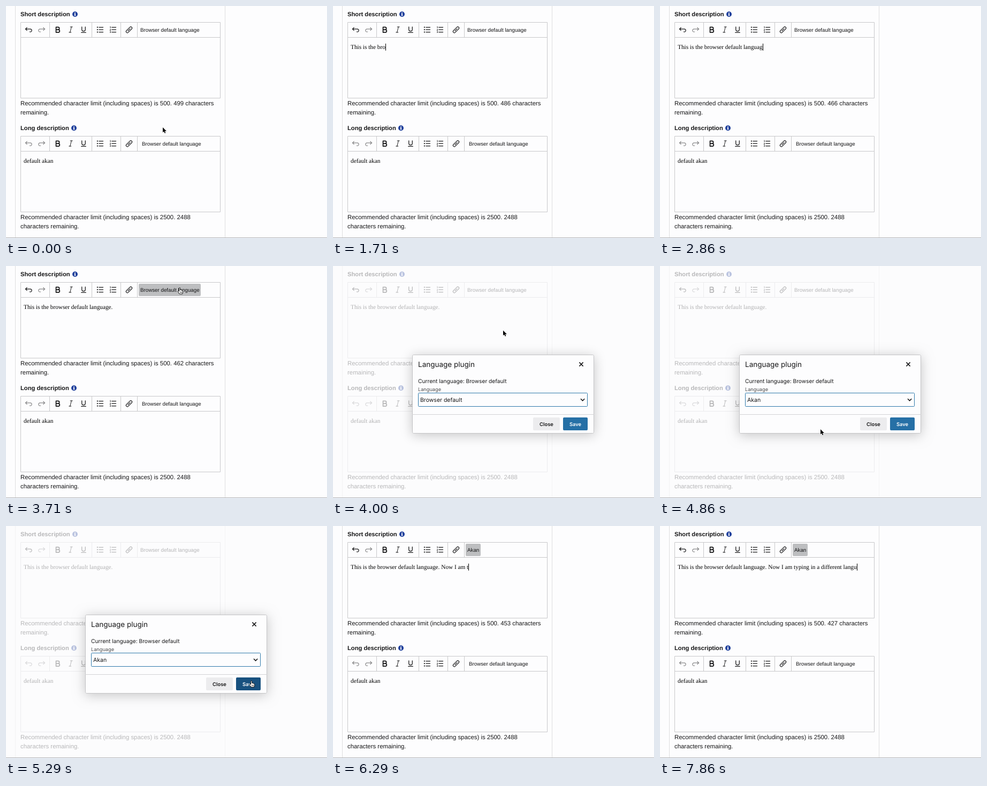
These frames come from a looping animation (600 px wide and 432 px high, 8000 ms). An HTML page with a canvas:

```html
<!DOCTYPE html>
<html lang="en">
<head>
<meta charset="utf-8">
<title>Editor language plugin</title>
<style>
  html, body { margin: 0; width: 100%; height: 100%; overflow: hidden; background: #fdfdfe; }
  canvas { display: block; width: 600px; height: 432px; }
</style>
</head>
<body>
<canvas id="stage"></canvas>
<script>
const W = 600, H = 432, LOOP = 8000, FPS = 7;
const canvas = document.getElementById('stage');
const ctx = canvas.getContext('2d');
const ratio = window.devicePixelRatio || 1;
canvas.width = W * ratio;
canvas.height = H * ratio;

const SANS = '"Liberation Sans", Arial, sans-serif';
const SERIF = '"Liberation Serif", Times, serif';
const UI = 'Inter, "Noto Sans", "DejaVu Sans", sans-serif';
const PAGE = '#fdfdfe', INK = '#161617', LINE = '#c8c8ca';

const FIRST = 'This is the browser default language.';
const FULL = FIRST + ' Now I am typing in a different langu';
const DEFAULT = 'Browser default';

// Menu entries; scripts with a smaller fallback face carry their own size.
const LANGUAGES = [[DEFAULT], ['аҧсуа'], ['Afaraf'], ['Afrikaans'], ['Akan'], ['Shqip'],
  ['አማርኛ', 12.4], ['العربية'], ['Aragonés'], ['Հայերեն'], ['অসমীয়া', 14.4],
  ['авар мацӀ, магӀарул мацӀ']];

// Pointer keys: step, x, y, shape; each holds until the next one.
const POINTER = [
  [0, 293, 226, 'arrow'], [1, 296, 220, 'arrow'], [2, 310, 182, 'arrow'],
  [3, 327, 125, 'beam'], [4, 331, 104, 'beam'], [6, 0, 0, ''],
  [25, 325, 44, 'hand'], [26, 325, 40.5, 'hand'], [28, 318, 120, 'arrow'],
  [29, 284, 247, 'hand'], [30, 279, 252, 'hand'], [31, 272, 284, 'hand'],
  [32, 262, 309, 'hand'], [34, 300, 304, 'arrow'], [35, 385, 297, 'hand'],
  [36, 452, 290, 'hand'], [37, 459, 288.5, 'hand'], [38, 459, 289, 'arrow'], [39, 0, 0, '']
];
const MODAL_OPEN = 28, MENU_OPEN = 30, MENU_SHUT = 34, SAVE_HOVER = 36, MODAL_SHUT = 38;

// Icons live on a 20 by 20 grid.
const ICONS = {
  undo: 'M6.7 5.3 3 8.6 6.7 11.8 M3.4 8.6H14a3.3 3.3 0 1 1-1.1 6.3',
  bold: 'M6 4h4.6a2.8 2.8 0 0 1 0 5.8H6z M6 9.8h5.2a3.1 3.1 0 0 1 0 6.2H6z',
  italic: 'M9 3.8h5 M6 16.2h5 M11.7 3.8 8.4 16.2',
  underline: 'M6 3.4v5.8a4 4 0 0 0 8 0V3.4 M4.8 16.4h10.4',
  lines: 'M8 4.6h9.4 M8 10.1h9.4 M8 15.6h9.4',
  link: 'M1.2 2.9H-5.6a2.9 2.9 0 0 1 0-5.8h3.2 M-1.2-2.9H5.6a2.9 2.9 0 0 1 0 5.8H2.4 M-3.4 0H3.4'
};
for (const name in ICONS) ICONS[name] = new Path2D(ICONS[name]);

const ARROW = new Path2D('M0 0V9.6L2.2 7.6 3.7 11 5.3 10.3 3.9 7H6.9Z');
const HAND = new Path2D('M-1.4 6.6V1A1.1 1.1 0 0 1 .8 1V4.2Q2.4 3.5 2.8 4.7 4.2 4.1 4.5 5.4 ' +
  '5.6 5.2 5.6 6.6V8.3L4.7 11.5H-.8L-3.6 7.4Q-3.7 5.9-2.5 6Z');
const BEAM = new Path2D('M-2.5-6.5Q0-6.5 0-5 0-6.5 2.5-6.5M0-5V5M-2.5 6.5Q0 6.5 0 5 0 6.5 2.5 6.5');

function text(str, x, y, size, family, color = INK, weight = 400, align = 'left') {
  ctx.font = `${weight} ${size}px ${family}`;
  ctx.fillStyle = color;
  ctx.textAlign = align;
  ctx.fillText(str, x, y);
}

function rect(x, y, w, h, color) {
  ctx.fillStyle = color;
  ctx.fillRect(x, y, w, h);
}

function round(x, y, w, h, r, color) {
  ctx.beginPath();
  ctx.roundRect(x, y, w, h, r);
  ctx.fillStyle = color;
  ctx.fill();
}

function frame(x, y, w, h, color, r = 0) {
  ctx.beginPath();
  ctx.roundRect(x + .5, y + .5, w - 1, h - 1, r);
  ctx.strokeStyle = color;
  ctx.lineWidth = 1;
  ctx.stroke();
}

function line(path, color, width) {
  ctx.strokeStyle = color;
  ctx.lineWidth = width;
  ctx.stroke(new Path2D(path));
}

function dot(x, y, r, color) {
  ctx.beginPath();
  ctx.arc(x, y, r, 0, Math.PI * 2);
  ctx.fillStyle = color;
  ctx.fill();
}

function withShadow(blur, dy, color, draw) {
  ctx.save();
  ctx.shadowBlur = blur * ratio;
  ctx.shadowOffsetY = dy * ratio;
  ctx.shadowColor = color;
  draw();
  ctx.restore();
}

function icon(name, cx, cy, { width = 1.5, alpha = 1, flip = 1, extra } = {}) {
  ctx.save();
  ctx.translate(cx, cy);
  ctx.scale(.815 * flip, .815);
  if (name === 'link') ctx.rotate(-Math.PI / 4);
  else ctx.translate(-10, -10);
  ctx.globalAlpha = alpha;
  ctx.strokeStyle = INK;
  ctx.lineWidth = width;
  ctx.lineCap = ctx.lineJoin = 'round';
  ctx.stroke(ICONS[name]);
  if (extra) extra();
  ctx.restore();
}

const bullets = () => [4.6, 10.1, 15.6].forEach(y => dot(4.4, y, 1.4, INK));
const digits = () => [1, 2, 3].forEach(n => text(n, 3, n * 5.5 + 1.2, 5.8, SANS, INK, 700));

function info(x, y) {
  dot(x, y, 5, '#20409c');
  rect(x - .8, y - 3.4, 1.7, 1.6, '#fff');
  rect(x - 1.4, y - 1, 2.2, 1, '#fff');
  rect(x - .8, y - 1, 1.7, 3.6, '#fff');
  rect(x - 1.6, y + 2, 3.2, 1, '#fff');
}

function editor(top, canUndo) {
  frame(27, top, 374, 142, LINE);
  rect(27, top + 28, 374, 1, LINE);
  [81, 160, 214, 245].forEach(x => rect(x, top, 1, 28, LINE));
  const y = top + 14;
  icon('undo', 42, y, { alpha: canUndo ? 1 : .5 });
  icon('undo', 67, y, { alpha: .5, flip: -1 });
  icon('bold', 96.8, y + .2, { width: 2.1 });
  icon('italic', 121, y, { width: 1.2 });
  icon('underline', 145, y + .2, { width: 1.6 });
  icon('lines', 175.5, y, { width: 1.6, extra: bullets });
  icon('lines', 199.5, y, { width: 1.6, extra: digits });
  icon('link', 230, y + .3, { width: 1.4 });
}

function note(limit, left, y) {
  const lead = `Recommended character limit (including spaces) is ${limit}. `;
  const short = limit === 500;
  text(lead + left + (short ? ' characters' : ''), 27, y, 11.4, SANS);
  text(short ? 'remaining.' : 'characters remaining.', 27, y + 17, 11.4, SANS);
}

function typed(step) {
  const count = step < 39
    ? Math.min(FIRST.length, 5 + 2.5 * (step - 8))
    : Math.max(FIRST.length, 39 + 2.31 * (step - 40));
  return Math.max(0, Math.round(count));
}

function page(step) {
  rect(0, 0, W, H, PAGE);
  rect(17, 0, 1, H, '#dededf');
  rect(409, 0, 1, H, '#dededf');
  rect(0, 431, W, 1, '#b4b4b6');

  text('Short description', 27, 19, 11.2, SANS, INK, 700);
  info(129, 15.3);
  editor(30, true);
  const akan = step >= MODAL_SHUT;
  if (akan) round(248, 33, 28, 23, 2, '#bdbec0');
  else if (step >= 25 && step < MODAL_OPEN) round(248, 33, 116, 23, 2, '#bdbec0');
  text(akan ? 'Akan' : 'Browser default language', 251, 48, 9.75, SANS);

  const count = typed(step);
  text(FULL.slice(0, count), 33, 80, 11.28, SERIF, '#000');
  const caret = (step >= 5 && step < 25) || step >= MODAL_SHUT;
  if (caret) rect(Math.round(33 + ctx.measureText(FULL.slice(0, count)).width), 70, 1, 13, '#000');
  const lag = count > typed(step - 1) ? 2 : 0;
  note(500, 499 - Math.max(0, count - lag), 185);

  text('Long description', 27, 231, 11.2, SANS, INK, 700);
  info(127, 227.3);
  editor(242, false);
  text('Browser default language', 254, 260, 9.75, SANS);
  text('default akan', 33, 292, 11.28, SERIF, '#000');
  note(2500, 2488, 397);
}

function modal(value, saveColor) {
  rect(0, 0, W, 431, 'rgba(253,253,254,.7)');
  withShadow(22, 3, 'rgba(0,0,0,.22)', () => round(148, 165, 340, 147, 2, PAGE));
  frame(148, 165, 340, 147, '#c4c4c6', 2);
  text('Language plugin', 159, 188, 13.5, UI);
  line('M460.4 179.4 467.6 186.6M467.6 179.4 460.4 186.6', INK, 1.5);
  text('Current language: ' + DEFAULT, 159, 218, 10.2, UI);
  text('Language', 159, 233, 9.2, UI, '#4c4c4e');
  frame(159, 236, 317, 26, '#2f79ab', 1);
  text(value, 163, 253, 10.5, UI);
  line('M463 247.2 466.6 250.8 470.2 247.2', INK, 1.6);
  rect(148, 276, 340, 1, '#d3d3d5');
  round(374, 282, 50, 24, 2, '#ececee');
  text('Close', 399, 297.5, 9.4, UI, INK, 600, 'center');
  round(430, 282, 46, 24, 2, saveColor);
  text('Save', 453, 297.5, 9.4, UI, '#fff', 600, 'center');
}

function menu(hover) {
  withShadow(14, 4, 'rgba(0,0,0,.28)', () => round(152, 239, 317, 210, 4, '#ebebed'));
  const tint = ctx.createRadialGradient(452, 294, 2, 452, 294, 50);
  tint.addColorStop(0, 'rgba(178,218,238,.55)');
  tint.addColorStop(1, 'rgba(178,218,238,0)');
  rect(400, 242, 69, 104, tint);
  LANGUAGES.forEach(([name, size = 10.7], i) => {
    const y = 241 + i * 15.6, on = i === hover;
    if (on) rect(152, y + .7, 317, 15.8, '#3f80f0');
    const color = on ? '#fff' : INK;
    if (!i) line('M156.5 249.2 158.6 251.8 162.3 245.4', color, 1.3);
    text(name, 167, y + 11.4, size, UI, color);
  });
}

function pointer(step) {
  const [, x, y, shape] = POINTER.findLast(key => key[0] <= step);
  if (!shape) return;
  ctx.save();
  ctx.translate(x, y);
  ctx.lineJoin = 'round';
  if (shape === 'beam') {
    ctx.strokeStyle = '#222';
    ctx.lineWidth = 1;
    ctx.stroke(BEAM);
  } else if (shape === 'arrow') {
    ctx.strokeStyle = '#fff';
    ctx.fillStyle = '#000';
    ctx.lineWidth = 1.4;
    ctx.stroke(ARROW);
    ctx.fill(ARROW);
  } else {
    ctx.strokeStyle = '#111';
    ctx.fillStyle = '#fff';
    ctx.lineWidth = 1;
    ctx.fill(HAND);
    ctx.stroke(HAND);
    line('M.6 7.2V9.6M2.1 7.2V9.6M3.6 7.2V9.6', '#111', .7);
  }
  ctx.restore();
}

function draw() {
  const time = performance.now() % LOOP;
  const step = Math.min(55, Math.floor((time + 5) * FPS / 1000));
  ctx.setTransform(ratio, 0, 0, ratio, 0, 0);
  ctx.textRendering = 'geometricPrecision';
  page(step);
  if (step >= MODAL_OPEN && step < MODAL_SHUT) {
    modal(step < MENU_SHUT ? DEFAULT : 'Akan', step < SAVE_HOVER ? '#2670a6' : '#18517f');
    if (step >= MENU_OPEN && step < MENU_SHUT) menu(Math.min(4, (step - MENU_OPEN) * 2));
  }
  pointer(step);
  requestAnimationFrame(draw);
}
requestAnimationFrame(draw);
</script>
</body>
</html>
```
